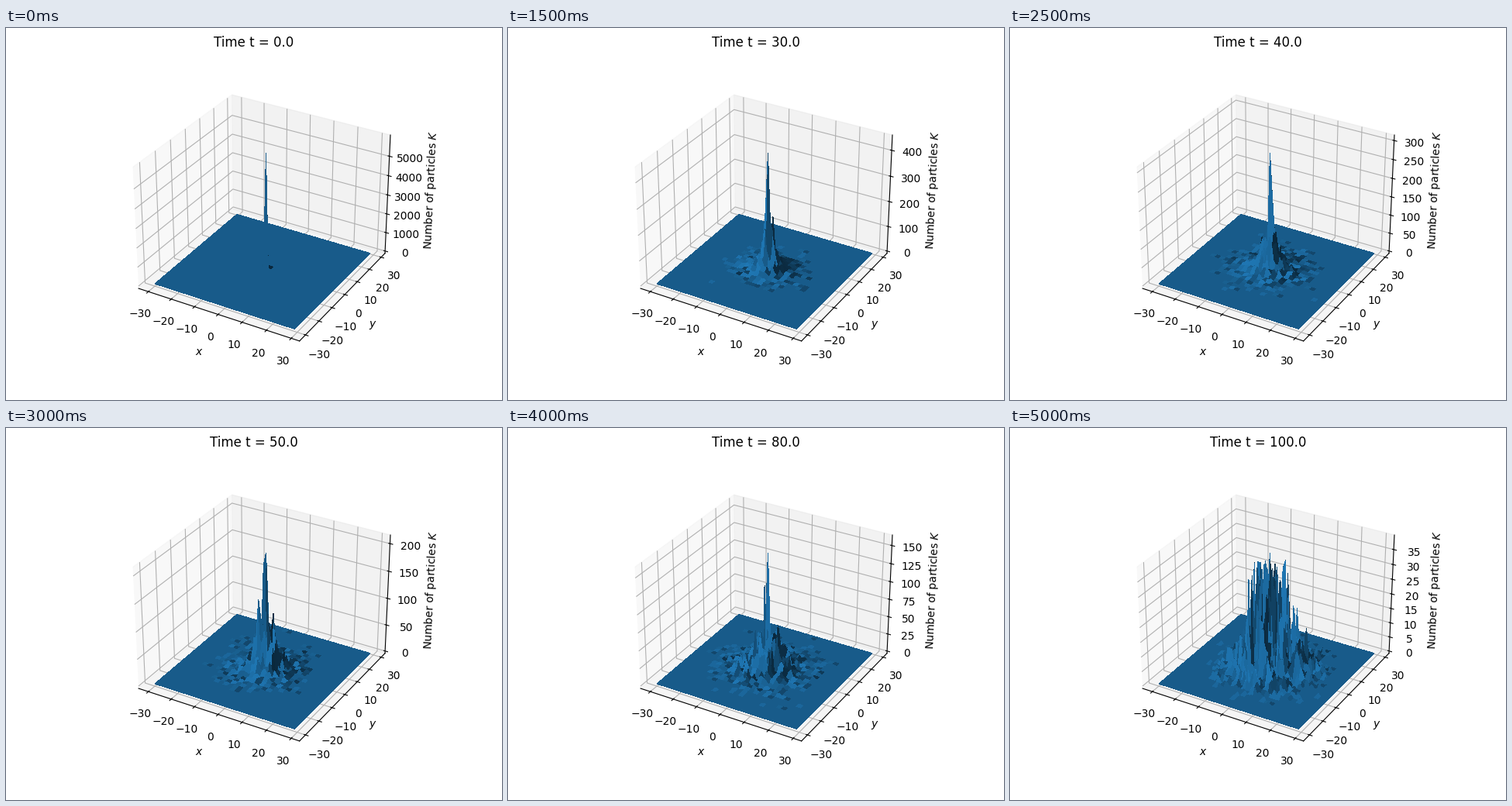
Write a matplotlib script that moves like this. It is 640x480 px and loops after 5500 ms.

```python
from math import gamma, pi

import numpy as np
import matplotlib.pyplot as plt
from matplotlib.animation import FuncAnimation
from matplotlib.ticker import MaxNLocator

HALF = 30
TOTAL = 7500
ORDER = [*range(0, 40, 10), 60, 40, 50, *range(70, 101, 10)]

# Peak height over time, interpolated on a log scale
KEY_TIMES = [0, 20, 50, 60, 80, 90, 100]
KEY_TOPS = [5950, 654, 211, 202, 161, 97, 39]

cells = np.arange(-HALF, HALF)
X, Y = np.meshgrid(cells, cells)
R = np.hypot(X, Y)


def peak(t):
    return round(np.exp(np.interp(t, KEY_TIMES, np.log(KEY_TOPS))))


def particles(t):
    """Random counts around a cusp that widens into a Gaussian hill."""
    rng = np.random.default_rng(100 + t)
    late = (t / 100) ** 6
    power = 1 + late
    length = 0.02 + 0.36 * t ** 0.5 + 6 * late
    amp = TOTAL * power / (2 * pi * length ** 2 * gamma(2 / power))
    mean = amp * np.exp(-(R / length) ** power)
    clump = 400 / (t + 1)
    count = rng.poisson(mean * rng.gamma(clump, 1 / clump, R.shape))
    count = np.minimum(count, int(0.9 * peak(t)))
    count[HALF, HALF] = peak(t)
    return count


def padded(lo, hi, margin=0.0):
    """Limits with a data margin plus the 3D view margin."""
    lo, hi = lo - margin * (hi - lo), hi + margin * (hi - lo)
    pad = (hi - lo) / 48
    return lo - pad, hi + pad


fig = plt.figure(figsize=(6.4, 4.8), dpi=100)
ax = fig.add_subplot(projection="3d")
title = fig.suptitle("")
ax.set_xlabel("$x$")
ax.set_ylabel("$y$")
ax.set_zlabel("Number of particles $K$")
locator = MaxNLocator(8, steps=[1, 2, 2.5, 5, 10])
surface = None


def update(i):
    global surface
    t = ORDER[i]
    top = peak(t)
    if surface is not None:
        surface.remove()
    surface = ax.plot_surface(X, Y, particles(t), color="C0",
                              linewidth=0, antialiased=False)
    ax.set_zticks([v for v in locator.tick_values(0, top) if 0 <= v <= top])
    ax.set_xlim(*padded(cells[0], cells[-1], 0.05))
    ax.set_ylim(*padded(cells[0], cells[-1], 0.05))
    ax.set_zlim(*padded(0, top))
    title.set_text(f"Time t = {t:.1f}")
    return surface, title


anim = FuncAnimation(fig, update, frames=len(ORDER), interval=500,
                     repeat=True, repeat_delay=0, blit=False)
plt.show()
```
